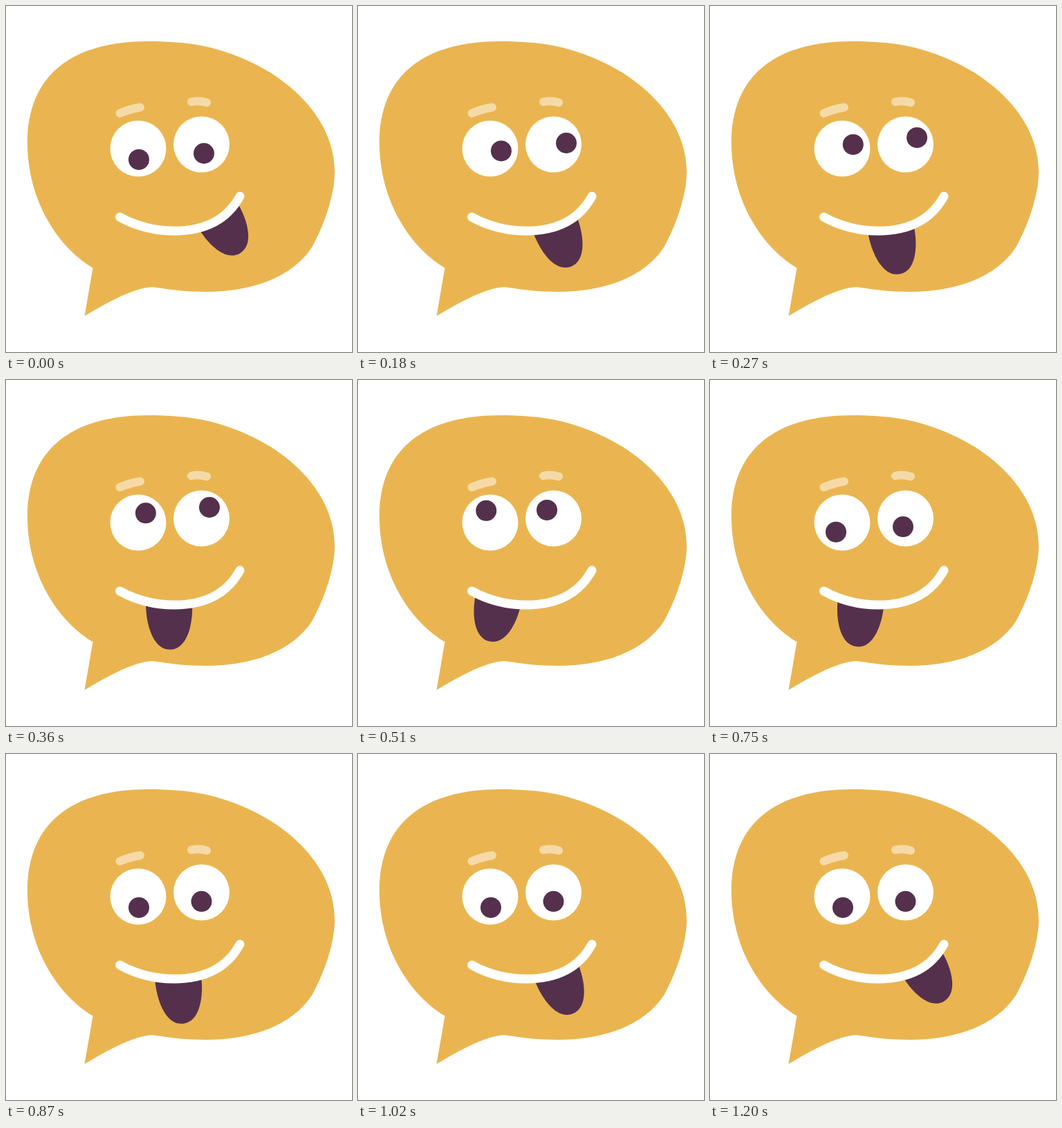
An HTML page with a canvas that plays this animation: 500 by 500 pixels, repeating every 1980 ms.

```html
<!DOCTYPE html>
<html lang="en">
<head>
<meta charset="utf-8">
<title>Cheeky speech bubble</title>
<style>
  html, body { margin: 0; width: 100%; height: 100%; overflow: hidden; background: #fff; }
  canvas { display: block; width: 500px; height: 500px; }
</style>
</head>
<body>
<canvas id="stage" width="500" height="500"></canvas>
<script>
const ctx = document.getElementById('stage').getContext('2d');
const LOOP = 1980, STEP = 30;
const GOLD = '#eab550', PLUM = '#55304c', WHITE = '#fff', BROW = '#f5daa7';

const bubble = new Path2D(
  'M113.5 448L125.5 378.5C70 345 31 275 31 198C31 100 95 51 206 51' +
  'C235 51 262 53 286 58C385 79 475 150 475 240C475 270 462 312 443 347' +
  'C415 392 355 413 289 413C262 413 238 410 218 407C195 402 150 426 113.5 448Z');
const smile = 'M164.5 305C188 318 215 325 243 325C288 325 320 308 338 275';
const mouth = new Path2D(smile);
const belowMouth = new Path2D(smile + 'L400 260V450H100V300Z');
const tongue = new Path2D(
  'M-33.5 -70V-34C-33 -5 -23 27 0 27C23 27 33 -5 33.5 -34V-70Z');
const brows = new Path2D('M164.5 155Q178 149 194 146.5M268 138.5Q279 136 290 139.5');

const rad = deg => deg * Math.PI / 180;
const smooth = u => {
  u = Math.min(1, Math.max(0, u));
  return u * u * (3 - 2 * u);
};

// Eye roll: angles run anticlockwise from straight down.
const rollTimes = [0, 180, 360, 510, 750, 840];
const leftRoll = [5, 75, 138, 198, 330, 365];
const rightRoll = [13.6, 91.5, 141.6, 222, 345.5, 360];
const rightReach = [14.9, 18.5, 18.5, 14.2, 14, 14.6];

function track(values, t) {
  const next = rollTimes.findIndex(time => time > t);
  if (next < 0) return values[values.length - 1];
  const start = rollTimes[next - 1];
  const u = (t - start) / (rollTimes[next] - start);
  return values[next - 1] + (values[next] - values[next - 1]) * u;
}

function disc(x, y, r, color) {
  ctx.fillStyle = color;
  ctx.beginPath();
  ctx.arc(x, y, r, 0, Math.PI * 2);
  ctx.fill();
}

function pupil(x, y, angle, reach) {
  disc(x + reach * Math.sin(rad(angle)), y + reach * Math.cos(rad(angle)), 15, PLUM);
}

function line(path, width, color) {
  ctx.lineCap = 'round';
  ctx.lineWidth = width;
  ctx.strokeStyle = color;
  ctx.stroke(path);
}

function drawTongue(t) {
  const travel = t < 570 ? smooth(t / 600) : 1 - smooth((t - 570) / 630);
  const swing = 41 - 71 * travel;
  ctx.save();
  ctx.clip(belowMouth);
  ctx.translate(247 + 118 * Math.sin(rad(swing)), 245 + 118 * Math.cos(rad(swing)));
  ctx.rotate(-rad(4.7 + 0.62 * swing));
  ctx.fillStyle = PLUM;
  ctx.fill(tongue);
  ctx.restore();
}

function draw(t) {
  ctx.fillStyle = WHITE;
  ctx.fillRect(0, 0, 500, 500);
  ctx.fillStyle = GOLD;
  ctx.fill(bubble);
  line(brows, 12, BROW);

  disc(191, 206, 40.5, WHITE);
  disc(282.5, 200, 40.5, WHITE);
  pupil(190.5, 205, track(leftRoll, t), 17);
  pupil(282.5, 198.5, track(rightRoll, t), track(rightReach, t));

  drawTongue(t);
  line(mouth, 13, WHITE);
}

const origin = performance.now();
function tick() {
  const t = (performance.now() - origin) % LOOP;
  draw(Math.floor(t / STEP) * STEP);
  requestAnimationFrame(tick);
}
tick();
</script>
</body>
</html>
```
